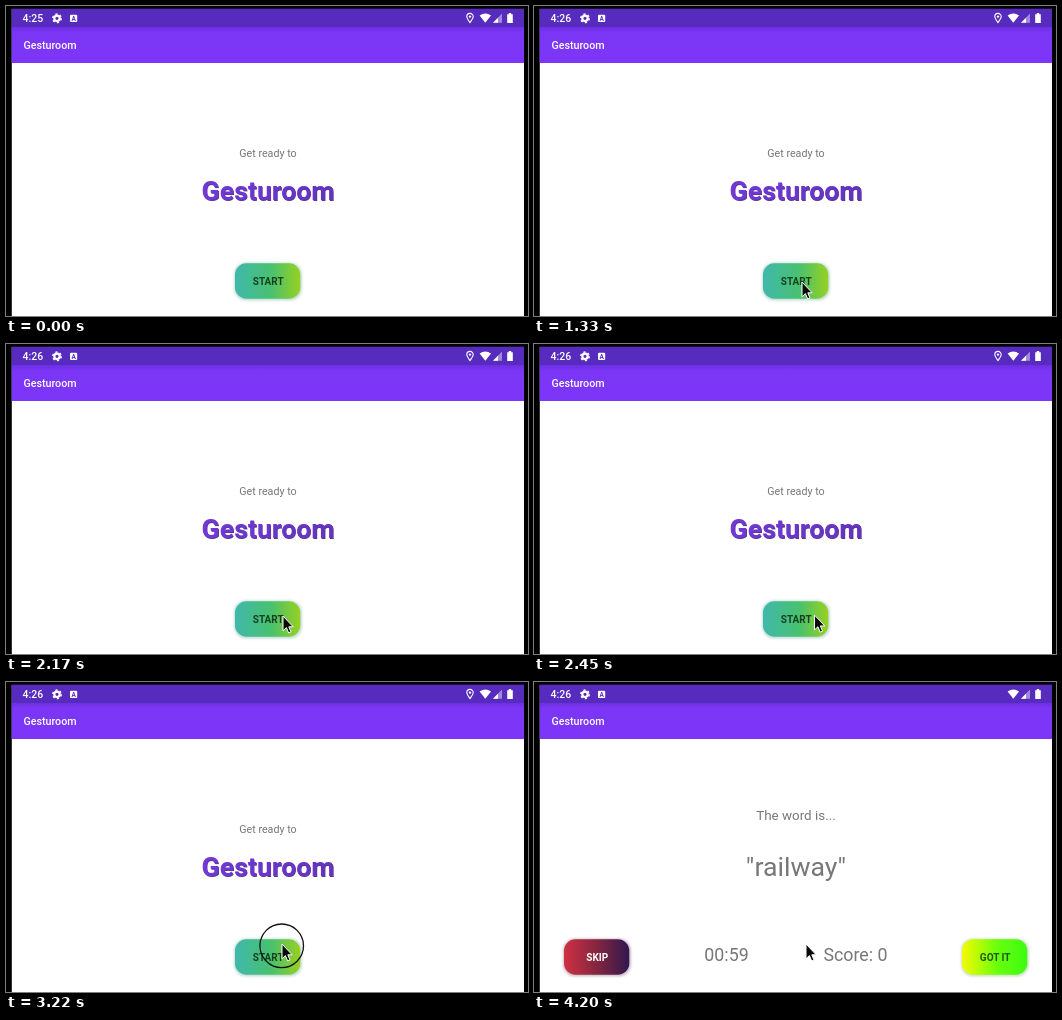
Animation of 522 by 310 pixels, one loop 4.41 s. Source, as an HTML page:

```html
<!DOCTYPE html>
<html lang="en">
<head>
<meta charset="utf-8">
<title>Gesturoom</title>
<style>
  html, body { margin: 0; width: 100%; height: 100%; overflow: hidden; background: #000; }
  svg { display: block; width: 522px; height: 310px; font-family: Roboto, "Noto Sans", sans-serif; }
  .bar { fill: #fff; font-weight: 500; }
  .body { fill: #777; text-anchor: middle; }
  .label { font-size: 10px; font-weight: 700; text-anchor: middle; }
</style>
</head>
<body>
<svg viewBox="0 0 522 310">
  <defs>
    <linearGradient id="startFill">
      <stop offset="0" stop-color="#40b8ac"/><stop offset=".55" stop-color="#48c170"/><stop offset="1" stop-color="#98d020"/>
    </linearGradient>
    <linearGradient id="skipFill">
      <stop offset="0" stop-color="#d03042"/><stop offset=".5" stop-color="#84263f"/><stop offset="1" stop-color="#31174f"/>
    </linearGradient>
    <linearGradient id="gotFill">
      <stop offset="0" stop-color="#f6fa00"/><stop offset=".55" stop-color="#68ff0c"/><stop offset="1" stop-color="#3cfb12"/>
    </linearGradient>
    <linearGradient id="titleFill">
      <stop offset="0" stop-color="#7338d8"/><stop offset="1" stop-color="#6433c0"/>
    </linearGradient>
    <linearGradient id="barFill" x2="0" y2="1">
      <stop offset="0" stop-color="#6c2fe2"/><stop offset=".15" stop-color="#7b36f5"/><stop offset="1" stop-color="#7d36f8"/>
    </linearGradient>
    <filter id="soft" x="-20%" y="-30%" width="140%" height="160%"><feGaussianBlur stdDeviation="1"/></filter>
    <filter id="blend" x="-2%" y="-10%" width="104%" height="120%"><feGaussianBlur stdDeviation=".5"/></filter>
  </defs>

  <rect width="522" height="310"/>
  <rect x="5.8" y="3" width="512.2" height="307" fill="#fff"/>

  <g id="startScreen">
    <text class="body" x="262" y="151" font-size="10.7">Get ready to</text>
    <g font-size="26.7" font-weight="700" text-anchor="middle">
      <text x="262.6" y="194.6" fill="#553a92">Gesturoom</text>
      <text x="262" y="194" fill="url(#titleFill)">Gesturoom</text>
    </g>
    <g id="startButton"></g>
  </g>

  <g id="gameScreen">
    <rect x="6" y="57" width="512" height="253" fill="#fff"/>
    <text class="body" x="262" y="138" font-size="13.4">The word is...</text>
    <text class="body" x="262" y="194" font-size="26.7">"railway"</text>
    <text class="body" x="192.5" y="279" font-size="17.8">00:59</text>
    <text class="body" x="321.5" y="279" font-size="17.8">Score: 0</text>
    <g id="gameButtons"></g>
  </g>

  <g filter="url(#blend)">
    <rect x="5.7" y="21" width="512.3" height="36" fill="url(#barFill)"/>
    <rect x="5.7" y="2.7" width="512.3" height="18.3" fill="#562bbd"/>
  </g>
  <text id="clock" class="bar" x="16.5" y="16" font-size="10.5"></text>
  <text class="bar" x="17.5" y="43" font-size="10.7">Gesturoom</text>

  <g fill="#fff">
    <circle cx="51" cy="12.3" r="2.7" fill="none" stroke="#fff" stroke-width="2.2"/>
    <circle cx="51" cy="12.3" r="4.2" fill="none" stroke="#fff" stroke-width="1.5" stroke-dasharray="2.2 2.2"/>
    <rect x="64" y="8.7" width="7.2" height="7.4" rx="1"/>
    <text x="67.6" y="15" font-size="6.5" font-weight="700" text-anchor="middle" fill="#562bbd">A</text>
    <g id="pin">
      <path d="M464 16.6C462 14 460.8 12.4 460.8 10.6A3.2 3.2 0 0 1 467.2 10.6C467.2 12.4 466 14 464 16.6Z" fill="none" stroke="#fff" stroke-width="1.1"/>
      <circle cx="464" cy="10.6" r="1.2"/>
    </g>
    <path d="M473.6 9.6Q479.3 5.6 485 9.6L479.3 16.8Z"/>
    <path d="M487 16.8L496 7.6V16.8Z" opacity=".45"/>
    <path d="M487 16.8L492 11.7V16.8Z"/>
    <path d="M501.2 8.2H502.8V7H505.2V8.2H506.8V17H501.2Z"/>
  </g>

  <circle id="ring" fill="none" stroke="#111" stroke-width="1.3"/>
  <path id="cursor" d="M0 0V14.8L3.4 11.6L5.7 17L8 16L5.8 10.8H10.2Z" fill="#080808" stroke="#fff" stroke-width="1" stroke-linejoin="round"/>
</svg>
<script>
const LOOP = 4410, STEP = 70;
const $ = id => document.getElementById(id);

const button = (x, label, fill, ink, glow) => `
  <rect x="${x - 1}" y="256.5" width="68" height="38" rx="12" fill="${glow}" opacity=".7" filter="url(#soft)"/>
  <rect x="${x}" y="257.3" width="65.3" height="35.4" rx="11.5" fill="url(#${fill})"/>
  <text class="label" x="${x + 33.2}" y="279" fill="${ink}">${label}</text>`;

$('startButton').innerHTML = button(229, 'START', 'startFill', '#17401f', '#a9d0c8');
$('gameButtons').innerHTML =
  button(30, 'SKIP', 'skipFill', '#fff', '#b9a3b8') +
  button(428, 'GOT IT', 'gotFill', '#1c5a18', '#b5d6a8');

// Pointer path: time, x, y
const path = [
  [700, 305, 312], [1190, 268, 280], [1330, 268, 276], [1610, 268, 276],
  [2170, 277, 272], [2400, 277, 272], [2800, 359.5, 251.5],
  [3150, 276, 262], [3430, 276, 262], [3920, 272, 262], [LOOP, 272, 262]
];

const clamp = v => Math.min(1, Math.max(0, v));
const ease = p => p * p * (3 - 2 * p);

function pointer(t) {
  const i = Math.max(1, path.findIndex(key => key[0] > t));
  const [t0, x0, y0] = path[i - 1], [t1, x1, y1] = path[i];
  const p = ease(clamp((t - t0) / (t1 - t0)));
  return [x0 + (x1 - x0) * p, y0 + (y1 - y0) * p];
}

const show = (id, on) => $(id).setAttribute('visibility', on ? 'visible' : 'hidden');

function draw(now) {
  const t = Math.floor((now % LOOP) / STEP) * STEP;
  const [x, y] = pointer(t);

  $('clock').textContent = t < 560 ? '4:25' : '4:26';
  show('pin', t < 3640);
  show('cursor', t >= 700);
  $('cursor').setAttribute('transform', `translate(${x} ${y})`);

  show('ring', t >= 3150 && t < 3290);
  $('ring').setAttribute('cx', x - .3);
  $('ring').setAttribute('cy', y + 1.8);
  $('ring').setAttribute('r', 12 + 9.8 * clamp((t - 3150) / 70));

  $('gameScreen').setAttribute('opacity', clamp((t - 3990) / 210));
  show('gameScreen', t >= 4060);
}

function tick() {
  draw(performance.now());
  requestAnimationFrame(tick);
}
tick();
</script>
</body>
</html>
```
